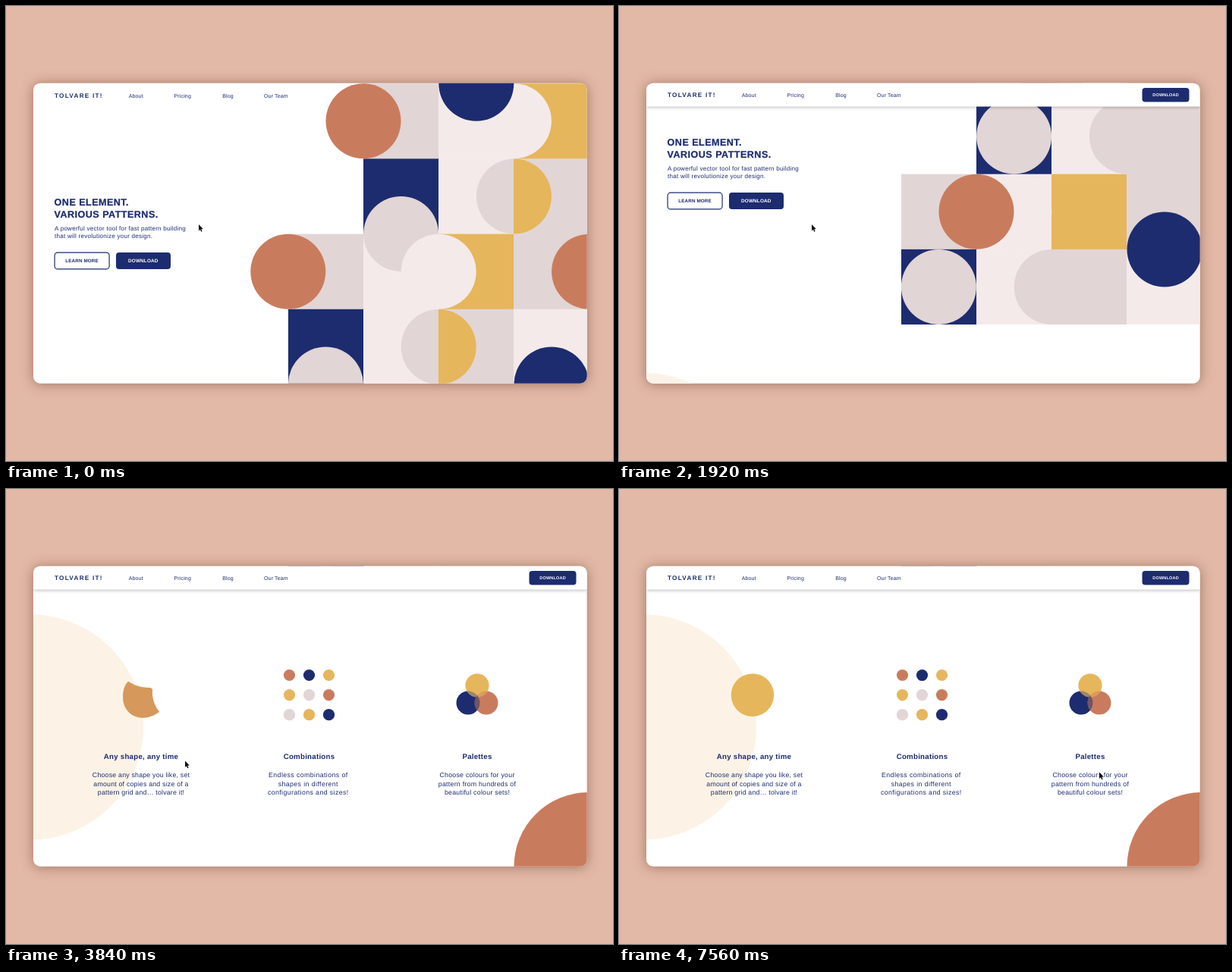
Write an HTML page with a canvas that moves like this. It is 800x600 px and loops after 7640 ms.

```html
<!DOCTYPE html>
<html lang="en">
<head>
<meta charset="utf-8">
<title>Landing page animation</title>
<style>
html, body { margin: 0; width: 100%; height: 100%; overflow: hidden; background: #e2b8a6; }
canvas { display: block; }
</style>
</head>
<body>
<canvas id="stage" width="800" height="600"></canvas>
<script>
const LOOP = 7640, SCROLL = 397, CELL = 99.2, R = 49.5;
const NAVY = '#1d2c6f', GOLD = '#e6b65c', CLAY = '#c97c5d',
      GREY = '#e2d5d5', PINK = '#f5eaea', CREAM = '#fcf3e6';
const FONT = '"Liberation Sans", Arial, sans-serif';
const c = document.getElementById('stage').getContext('2d');
c.textRendering = 'geometricPrecision';

const lerp = (a, b, k) => a + (b - a) * k;

// Eased progress of t between two moments
function ease(t, from, to) {
  const u = Math.min(1, Math.max(0, (t - from) / (to - from)));
  return u < .5 ? 4 * u ** 3 : 1 - 4 * (1 - u) ** 3;
}

function circle(x, y, r, color) {
  c.beginPath();
  c.arc(x, y, Math.max(0, r), 0, 7);
  c.fillStyle = color;
  c.fill();
}

function rect(x, y, w, h, color) {
  c.fillStyle = color;
  c.fillRect(x, y, w, h);
}

function box(x, y, w, h, r) {
  c.beginPath();
  c.roundRect(x, y, w, h, r);
}

function text(str, x, y, size, spacing = 0, weight = 400, align = 'left', color = NAVY) {
  c.font = `${weight} ${size}px ${FONT}`;
  c.letterSpacing = spacing + 'px';
  c.textAlign = align;
  c.fillStyle = color;
  c.fillText(str, x, y);
}

// Runs a drawing inside its own state, optionally clipped by the current path
function within(draw, clip) {
  c.save();
  if (clip) { clip(); c.clip(); }
  draw();
  c.restore();
}

const cell = (x, y, color) => rect(Math.round(x), y, CELL + .8, CELL + .4, color);

function tileCells(x, y) {
  [[GREY, PINK, GOLD], [NAVY, PINK, GREY]].forEach((row, j) =>
    row.forEach((color, i) => cell(x + i * CELL, y + j * CELL, color)));
}

function tileCircles(x, y, slide, rest) {
  const mid = y + CELL / 2, low = mid + CELL, right = x + 2 * CELL;
  circle(right - rest * R, mid, R, PINK);
  circle(right, low, R, GREY);
  within(() => circle(right - rest * CELL, low, R, GOLD),
    () => { c.beginPath(); c.rect(Math.round(right), y + CELL, CELL, CELL); });
  circle(x + CELL / 2, y + 2 * CELL - rest * CELL / 2, R, GREY);
  circle(x + slide * CELL, mid, R, CLAY);
}

function pattern(t) {
  const a = ease(t, 240, 1140), b = ease(t, 1080, 1980);
  const x = 371.8, y = 102.2, last = x + 3 * CELL;
  tileCells(x + CELL, y);
  tileCells(x, y + 2 * CELL);
  cell(last, y + 2 * CELL, GREY);
  cell(last, y + 3 * CELL, PINK);
  tileCircles(x + CELL, y, a, a);
  tileCircles(x, y + 2 * CELL, a, b);
  circle(x + (4 + a) * CELL, y + 2.5 * CELL, R, CLAY);
  circle(x + 2.5 * CELL, y - a * CELL, R, NAVY);
  circle(x + 3.5 * CELL, y + (4 - b) * CELL, R, NAVY);
}

function hero(t) {
  within(() => pattern(t), () => { c.beginPath(); c.rect(0, 0, 800, 499); });
  c.strokeStyle = NAVY;
  c.lineWidth = .25;
  [['ONE ELEMENT.', 263.3], ['VARIOUS PATTERNS.', 279]].forEach(([str, y]) => {
    text(str, 63.6, y, 12.6, .45, 700);
    c.strokeText(str, 63.6, y);
  });
  text('A powerful vector tool for fast pattern building', 64, 296.4, 8.1, .23);
  text('that will revolutionize your design.', 64, 306.4, 8.1, .23);
  box(64.1, 325.1, 72, 21.8, 4);
  c.lineWidth = 1.2;
  c.stroke();
  text('LEARN MORE', 78.3, 338.3, 6.3, .12, 700);
  box(145, 325, 72, 22, 4);
  c.fillStyle = NAVY;
  c.fill();
  text('DOWNLOAD', 161, 338.3, 6.4, .15, 700, 'left', '#fff');
}

// Knots and handles of the bitten disc, around its centre
const BITE = [[-15, -18], [-6, -12], [4, -10], [12, -10], [16, -10], [18, -8], [17, -4],
  [17, 6], [20, 14], [26, 22], [20, 27], [12, 30], [4, 30], [-10, 30], [-22, 19],
  [-22, 3], [-22, -6], [-20, -13], [-15, -18]];
const KNOTS = [-130, -60, -30, 40, 90, 180, 230].map(d => d * Math.PI / 180);

// The same number of points laid out on a true circle
function discPoints(r) {
  const at = (a, k) => [r * (Math.cos(a) - k * Math.sin(a)), r * (Math.sin(a) + k * Math.cos(a))];
  const pts = [at(KNOTS[0], 0)];
  for (let i = 1; i < KNOTS.length; i++) {
    const k = 4 / 3 * Math.tan((KNOTS[i] - KNOTS[i - 1]) / 4);
    pts.push(at(KNOTS[i - 1], k), at(KNOTS[i], -k), at(KNOTS[i], 0));
  }
  return pts;
}
const DISC = discPoints(28.2);

function shapeIcon(t) {
  const k = ease(t, 3640, 4040) - ease(t, 4440, 4900);
  const p = DISC.map(([x, y], i) =>
    [176 + lerp(x, BITE[i][0], 2 * k), 271.7 + lerp(y, BITE[i][1], 2 * k)]);
  c.beginPath();
  c.moveTo(...p[0]);
  for (let i = 1; i < p.length; i += 3) c.bezierCurveTo(...p[i], ...p[i + 1], ...p[i + 2]);
  c.fillStyle = GOLD;
  c.fill();
  c.globalAlpha = k;
  c.fillStyle = CLAY;
  c.fill();
  c.globalAlpha = 1;
}

// Scattered place and radius of each dot; radius 0 tucks it behind a larger one
const DOTS = [
  [CLAY, 394, 246, 7.5], [NAVY, 401.5, 266, 8.6], [GOLD, 422.5, 248, 0],
  [GOLD, 373, 260.5, 7.5], [GREY, 422.5, 248.3, 10.3], [CLAY, 418.4, 289, 14.3],
  [GREY, 383, 289, 10.3], [GOLD, 418.4, 289, 0], [NAVY, 418.4, 289, 0]];

function dotsIcon(t) {
  const k = ease(t, 4700, 5120) - ease(t, 6400, 7620);
  DOTS.forEach(([color, x, y, r], i) => circle(
    lerp(373.5 + 26 * (i % 3), x, k),
    lerp(245.5 + 26.1 * Math.floor(i / 3), y, k),
    lerp(7.6, r, k), color));
}

function paletteIcon() {
  const discs = [[609, 282, 15.5, NAVY], [633, 282, 15.5, CLAY], [621, 259, 15.6, GOLD]];
  discs.forEach(d => circle(...d));
  [[1, 0, .5], [2, 1, .45], [2, 0, .35]].forEach(([top, under, alpha]) => within(() => {
    c.globalAlpha = alpha;
    circle(...discs[under]);
  }, () => { c.beginPath(); c.arc(...discs[top].slice(0, 3), 0, 7); }));
}

const COLUMNS = [
  [178, 178, .2, 'Any shape, any time',
    'Choose any shape you like, set', 'amount of copies and size of a', 'pattern grid and… tolvare it!'],
  [399.5, 398.3, .4, 'Combinations',
    'Endless combinations of', 'shapes in different', 'configurations and sizes!'],
  [621, 621, .25, 'Palettes',
    'Choose colours for your', 'pattern from hundreds of', 'beautiful colour sets!']];

function features(t) {
  circle(32.5, 314, 148.5, CREAM);
  circle(767.5, 498, 98, CLAY);
  shapeIcon(t);
  dotsIcon(t);
  paletteIcon();
  COLUMNS.forEach(([titleX, x, spacing, title, ...lines]) => {
    text(title, titleX, 355.6, 9.7, .25, 700, 'center');
    lines.forEach((line, i) => text(line, x, 380.4 + 11.2 * i, 8.8, spacing, 400, 'center'));
  });
}

function header(t) {
  const k = ease(t, 1600, 1960), y = 120.9 - .7 * k;
  within(() => {
    c.globalAlpha = k;
    c.shadowColor = 'rgba(60,50,60,.3)';
    c.shadowBlur = 4;
    c.shadowOffsetY = 1.5;
    rect(36, 96, 730, 36.6, '#fff');
    c.shadowColor = 'transparent';
    box(689.5, 108, 62, 18.5, 4);
    c.fillStyle = NAVY;
    c.fill();
    text('DOWNLOAD', 703.3, 119.3, 5.5, .2, 700, 'left', '#fff');
  });
  text('TOLVARE IT!', 64, y, 8.2, 1.25, 700);
  [['About', 161.7], ['Pricing', 221.5], ['Blog', 285.2], ['Our Team', 340]]
    .forEach(([str, x]) => text(str, x, y - .3, 7, .15));
}

function cursor(t) {
  const stops = [[254, 288], [236, 358.5], [409, 376.5], [633, 373.5]];
  const moves = [ease(t, 3160, 3760), ease(t, 4300, 4900), ease(t, 6300, 7100)];
  let [x, y] = stops[0];
  moves.forEach((k, i) => {
    x += k * (stops[i + 1][0] - stops[i][0]);
    y += k * (stops[i + 1][1] - stops[i][1]);
  });
  c.beginPath();
  [[0, 0], [0, 8.4], [1.9, 6.7], [3.2, 9.7], [4.6, 9.1], [3.3, 6.2], [5.8, 6.1]]
    .forEach(([dx, dy]) => c.lineTo(x + dx, y + dy));
  c.closePath();
  c.lineWidth = 1;
  c.strokeStyle = '#fff';
  c.stroke();
  c.fillStyle = '#111';
  c.fill();
}

function frame() {
  const t = performance.now() % LOOP;
  const scroll = SCROLL * ease(t, 1443, 2743);
  const card = () => box(36, 101.7, 729.7, 396, 9);
  rect(0, 0, 800, 600, '#e2b8a6');
  within(() => {
    c.shadowColor = 'rgba(105,60,45,.55)';
    c.shadowBlur = 16;
    c.shadowOffsetY = 1;
    card();
    c.fillStyle = '#fff';
    c.fill();
  });
  within(() => {
    within(() => { c.translate(0, -scroll); hero(t); });
    within(() => { c.translate(0, SCROLL - scroll); features(t); });
    header(t);
  }, card);
  cursor(t);
  requestAnimationFrame(frame);
}
frame();
</script>
</body>
</html>
```
